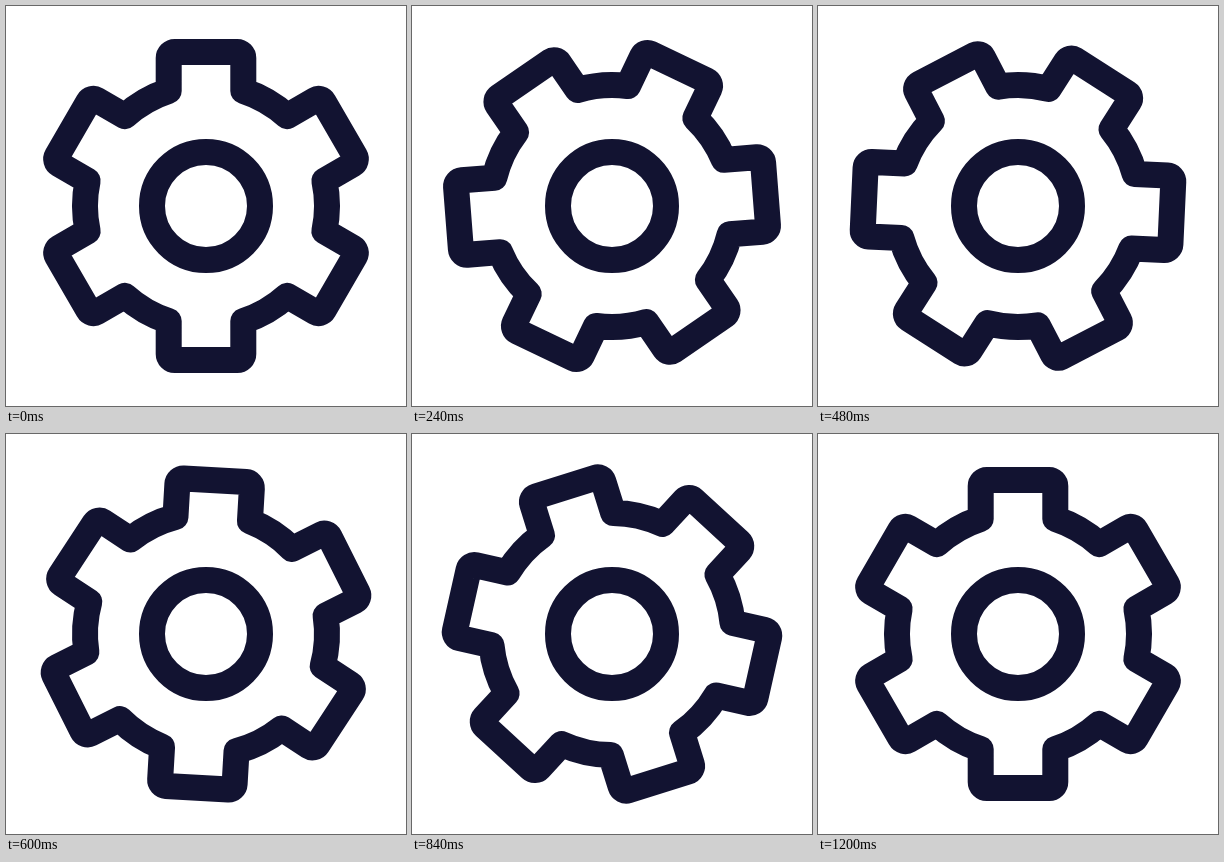
Animation of 400x400 px, one loop 3230 ms. Source, as an HTML page:

```html
<!DOCTYPE html>
<html lang="en">
<head>
<meta charset="utf-8">
<title>Turning gear</title>
<style>
  html, body { margin: 0; width: 100%; height: 100%; overflow: hidden; background: #fff; }
  svg { display: block; width: 100%; height: 100%; }
</style>
</head>
<body>
<svg viewBox="0 0 400 400">
  <g transform="translate(200 200)" fill="none" stroke="#121331" stroke-width="26" stroke-linejoin="round">
    <path id="gear"/>
    <circle r="54"/>
  </g>
</svg>
<script>
const LOOP = 3230, TURN = 1200, STEP = 30, SWEEP = 180;
const TEETH = 6, BODY = 121, TIP = 154, HALF = 37.3, ROUND = 6;
const gear = document.getElementById('gear');

// Outline: one tooth (pointing up) repeated around the centre, joined by body arcs.
function gearPath() {
  const base = Math.sqrt(BODY * BODY - HALF * HALF);
  let d = '';
  for (let i = 0; i < TEETH; i++) {
    const a = i * 2 * Math.PI / TEETH, c = Math.cos(a), s = Math.sin(a);
    const at = (x, y) => (x * c - y * s).toFixed(2) + ' ' + (x * s + y * c).toFixed(2);
    const arc = (r, x, y) => `A${r} ${r} 0 0 1 ${at(x, y)}`;
    d += i ? arc(BODY, -HALF, -base) : 'M' + at(-HALF, -base);
    d += 'L' + at(-HALF, ROUND - TIP) + arc(ROUND, ROUND - HALF, -TIP);
    d += 'L' + at(HALF - ROUND, -TIP) + arc(ROUND, HALF, ROUND - TIP);
    d += 'L' + at(HALF, -base);
  }
  return d + `A${BODY} ${BODY} 0 0 1 ${-HALF} ${-base.toFixed(2)}Z`;
}

// Cubic easing with handles (.333, 0) and (.38, 1).
function ease(x) {
  if (x <= 0) return 0;
  if (x >= 1) return 1;
  let lo = 0, hi = 1, u;
  for (let i = 0; i < 30; i++) {
    u = (lo + hi) / 2;
    const v = 1 - u;
    if (3 * u * v * v * 0.333 + 3 * u * u * v * 0.38 + u * u * u < x) lo = u;
    else hi = u;
  }
  return u * u * (3 - 2 * u);
}

function draw(ms) {
  const t = Math.floor((ms % LOOP) / STEP) * STEP;
  gear.setAttribute('transform', `rotate(${(SWEEP * ease(t / TURN)).toFixed(3)})`);
}

gear.setAttribute('d', gearPath());
draw(0);
const start = performance.now();
function tick() {
  draw(performance.now() - start);
  requestAnimationFrame(tick);
}
requestAnimationFrame(tick);
</script>
</body>
</html>
```
